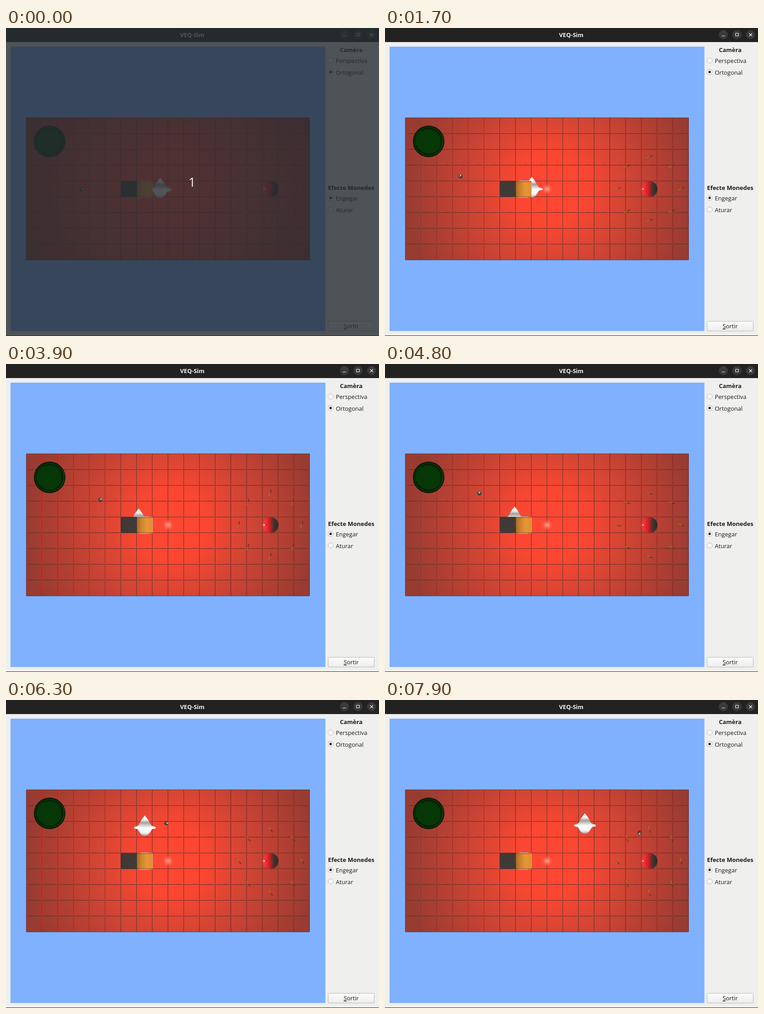
An HTML page for the animation above (8000 ms loop, 825 by 679 pixels).

```html
<!DOCTYPE html>
<html lang="ca">
<head>
<meta charset="utf-8">
<title>VEQ-Sim</title>
<style>
  html, body { margin: 0; width: 100%; height: 100%; overflow: hidden; background: #efefee; }
  svg { display: block; width: 825px; height: 679px; }
  text { font: 13px "Open Sans", "Noto Sans", sans-serif; fill: #1c1c1c; }
  .bold { font-weight: 700; }
  .mid { text-anchor: middle; }
</style>
</head>
<body>
<svg viewBox="0 0 825 679">
  <defs>
    <radialGradient id="floorFill" gradientUnits="userSpaceOnUse" cx="366" cy="355" r="325">
      <stop offset="0" stop-color="#ff4833"/>
      <stop offset=".23" stop-color="#fb4732"/>
      <stop offset=".5" stop-color="#d44534"/>
      <stop offset=".78" stop-color="#b23f33"/>
      <stop offset="1" stop-color="#983b31"/>
    </radialGradient>
    <radialGradient id="glow">
      <stop offset="0" stop-color="#ffc0b0" stop-opacity=".75"/>
      <stop offset=".4" stop-color="#ff9f8c" stop-opacity=".5"/>
      <stop offset="1" stop-color="#ff6040" stop-opacity="0"/>
    </radialGradient>
    <linearGradient id="bodyFill" x2="0" y2="1">
      <stop offset="0" stop-color="#fff"/>
      <stop offset=".2" stop-color="#f4f4f4"/>
      <stop offset=".36" stop-color="#a3a09f"/>
      <stop offset=".62" stop-color="#fff"/>
      <stop offset=".85" stop-color="#f4f4f4"/>
      <stop offset="1" stop-color="#a0a0a0"/>
    </linearGradient>
    <linearGradient id="crateFill">
      <stop offset="0" stop-color="#a96a26"/>
      <stop offset=".3" stop-color="#cd832f"/>
      <stop offset=".65" stop-color="#e99635"/>
      <stop offset="1" stop-color="#dc8d32"/>
    </linearGradient>
    <linearGradient id="ballFill">
      <stop offset="0" stop-color="#ff3f3f"/>
      <stop offset=".3" stop-color="#e8262c"/>
      <stop offset=".56" stop-color="#a02024"/>
      <stop offset=".7" stop-color="#3f3532"/>
      <stop offset="1" stop-color="#2b2a29"/>
    </linearGradient>
    <linearGradient id="buttonFill" x2="0" y2="1">
      <stop offset="0" stop-color="#fdfdfd"/>
      <stop offset="1" stop-color="#ededec"/>
    </linearGradient>
  </defs>

  <rect width="825" height="679" fill="#efefee"/>
  <rect width="825" height="31" fill="#222"/>
  <rect y="678" width="825" height="1" fill="#222"/>
  <text class="bold mid" x="412" y="19.5" style="fill:#f2f2f2">VEQ-Sim</text>
  <g fill="#3a3a3a">
    <circle cx="748.5" cy="14.5" r="10"/><circle cx="778.5" cy="14.5" r="10"/><circle cx="808.5" cy="14.5" r="10"/>
  </g>
  <path d="M745 17.5h7M775.5 11.5h6v6h-6zM805.5 11.5l6.500 6.500M812 11.500l-6.500 6.500" fill="none" stroke="#f2f2f2" stroke-width="1.2"/>

  <rect x="10" y="41" width="696.5" height="627" fill="#80b1ff"/>
  <rect x="45" y="198" width="626.500" height="313" rx="1" fill="url(#floorFill)"/>
  <g id="grid"></g>
  <circle cx="358.500" cy="355" r="13" fill="url(#glow)"/>

  <circle cx="96.500" cy="250" r="34" fill="#082c08" stroke="#061106" stroke-width="1.5"/>
  <circle cx="96.500" cy="250" r="28" fill="#063706" stroke="#020f02" stroke-width="1.2"/>
  <path d="M70 258a28 28 0 0 1 11-31M124 233a32 32 0 0 1-10 44" fill="none" stroke="#11500f"/>

  <path id="chaser" fill="url(#bodyFill)" d="M0-25Q4-20 9-13 12-5 16-2L23 0Q25 2 23 4L16 5Q12 12 8 17 0 23-8 17-12 12-16 5L-23 4Q-25 2-23 0L-16-2Q-12-5-9-13-4-20 0-25z"/>

  <rect x="254" y="337" width="35.500" height="35.500" fill="#403936"/>
  <rect x="286.500" y="353" width="1.500" height="2" fill="#6b625d"/>
  <rect x="289" y="337" width="35" height="36" rx="1" fill="url(#crateFill)"/>
  <path d="M289.500 337v36" stroke="#60452a"/>
  <path d="M324 340v30" stroke="#d9b483"/>
  <path d="M297 337h20M294 373.500h23" stroke="#a8a19a" stroke-width="2"/>
  <path d="M291 338.800h32M291 371.800h32" stroke="#6e4c28" stroke-width=".8"/>

  <g id="coins"></g>
  <circle cx="585" cy="355" r="17.700" fill="url(#ballFill)"/>
  <circle cx="571" cy="355" r="2" fill="#ffb9b5"/>

  <g id="runner">
    <circle r="4.600" fill="#433d39"/>
    <circle cx="2.200" r="2" fill="#b9b5b0"/>
    <circle cx="-1" cy="-1.500" r="1.200" fill="#777069"/>
  </g>

  <text class="bold mid" x="763.500" y="53">Camèra</text>
  <text class="bold mid" x="763.500" y="357">Efecte Monedes</text>
  <g id="radios"></g>
  <rect x="712.500" y="646.500" width="102" height="21.500" rx="2" fill="url(#buttonFill)" stroke="#b4b3b1"/>
  <text class="mid" x="763.500" y="662"><tspan text-decoration="underline">S</tspan>ortir</text>

  <g id="countdown">
    <rect width="825" height="679" fill="#262c32" fill-opacity=".8"/>
    <text class="mid" x="411.500" y="350" style="font-size:28px;fill:#f4ebe7">1</text>
  </g>
</svg>
<script>
const LOOP = 8000, FRAME = 100, TILE = 34.8;
const RUN_STEP = 6.95, CHASE_STEP = 4.1;
const $ = id => document.getElementById(id);

function add(parent, tag, attrs, label) {
  const node = document.createElementNS("http://www.w3.org/2000/svg", tag);
  for (const key in attrs) node.setAttribute(key, attrs[key]);
  if (label) node.textContent = label;
  return parent.appendChild(node);
}

function line(parent, x1, y1, x2, y2, stroke, width) {
  return add(parent, "line", { x1, y1, x2, y2, stroke, "stroke-width": width });
}

function buildGrid() {
  const grid = $("grid"), left = 45, top = 198, right = 671.5, bottom = 511;
  for (let row = 0; row <= 9; row++) {
    const y = top + row * TILE;
    line(grid, left, y, right, y, "#58322c", 1);
  }
  for (let col = 0; col <= 18; col++) {
    const x = left + col * TILE;
    line(grid, x, top, x, bottom, "#58322c", 1);
    if (col > 0 && col < 6) line(grid, x + 0.7, top, x + 0.7, bottom, "#e9301f", 0.9);
    if (col > 12 && col < 18) line(grid, x - 0.8, top, x - 0.8, bottom, "#bd3024", 0.7);
    for (let row = 1; row < 9; row++) {
      add(grid, "rect", { x: x - 0.5, y: top + row * TILE - 0.5, width: 1, height: 1, fill: "#a98279" });
    }
    for (const y of [302, 406.5]) {
      if (col < 18) add(grid, "rect", { x: x + 22, y: y - 1, width: 2, height: 1.5, fill: "#5d2f29" });
    }
  }
}

function buildRadios() {
  const options = [["Perspectiva", 72, false], ["Ortogonal", 97.5, true], ["Engegar", 375, true], ["Aturar", 400.5, false]];
  for (const [label, y, checked] of options) {
    add($("radios"), "circle", { cx: 718, cy: y - 0.5, r: 5.7, fill: "#fff", stroke: "#b0afad" });
    if (checked) add($("radios"), "circle", { cx: 718, cy: y - 0.5, r: 2.8, fill: "#2b2b2b" });
    add($("radios"), "text", { x: 729.5, y: y + 5 }, label);
  }
}

function buildCoins() {
  return Array.from({ length: 8 }, (_, i) => {
    const a = i * Math.PI / 4;
    const coin = add($("coins"), "g", {});
    line(coin, -8.5, 0, 8.5, 0, "#45321f", 1.3);
    line(coin, -7.5, -0.4, 1.5, -0.4, "#c8922e", 1.1);
    return { coin, x: 584.2 + 70 * Math.cos(a), y: 355 + 70 * Math.sin(a) };
  });
}

// Key presses: [time, dx, dy, count, interval]
const presses = [
  [700, 0, -1, 4, 250],
  [2000, 0, -1, 1, 0], [2300, 1, 0, 1, 0], [2450, 0, -1, 1, 0], [2800, 1, 0, 1, 0],
  [3100, 1, 0, 2, 200], [3500, 1, -1, 2, 300], [4200, 0, -1, 2, 400],
  [4950, 0, -1, 2, 100], [5150, 1, 0, 1, 0],
  [5666, 1, 0, 50, 33.33],
  [7450, 0, 1, 3, 150]
];

// The chaser takes one fixed step towards the runner per key press.
function positions(t) {
  const runner = { x: 167, y: 355, angle: 0 }, chaser = { x: 341, y: 355 };
  for (const [start, dx, dy, count, interval] of presses) {
    for (let i = 0; i < count && start + i * interval <= t; i++) {
      runner.x += dx * RUN_STEP;
      runner.y += dy * RUN_STEP;
      runner.angle = Math.atan2(dy, dx) * 180 / Math.PI;
      const gapX = runner.x - chaser.x, gapY = runner.y - chaser.y;
      const scale = CHASE_STEP / Math.hypot(gapX, gapY);
      chaser.x += gapX * scale;
      chaser.y += gapY * scale;
    }
  }
  return { runner, chaser };
}

function place(node, x, y, angle = 0) {
  node.setAttribute("transform", `translate(${x} ${y}) rotate(${angle})`);
}

buildGrid();
buildRadios();
const coins = buildCoins();

function draw(t) {
  const { runner, chaser } = positions(t);
  place($("runner"), runner.x, runner.y, runner.angle);
  place($("chaser"), chaser.x, chaser.y);
  // Folding to a half turn keeps the lit edge on the left.
  const spin = (37 + 0.101 * t + 90) % 180 - 90;
  for (const { coin, x, y } of coins) place(coin, x, y, -spin);
  $("countdown").setAttribute("display", t < FRAME ? "inline" : "none");
}

const begin = performance.now();
function tick() {
  const t = (performance.now() - begin) % LOOP;
  draw(Math.floor(t / FRAME) * FRAME);
  requestAnimationFrame(tick);
}
tick();
</script>
</body>
</html>
```
